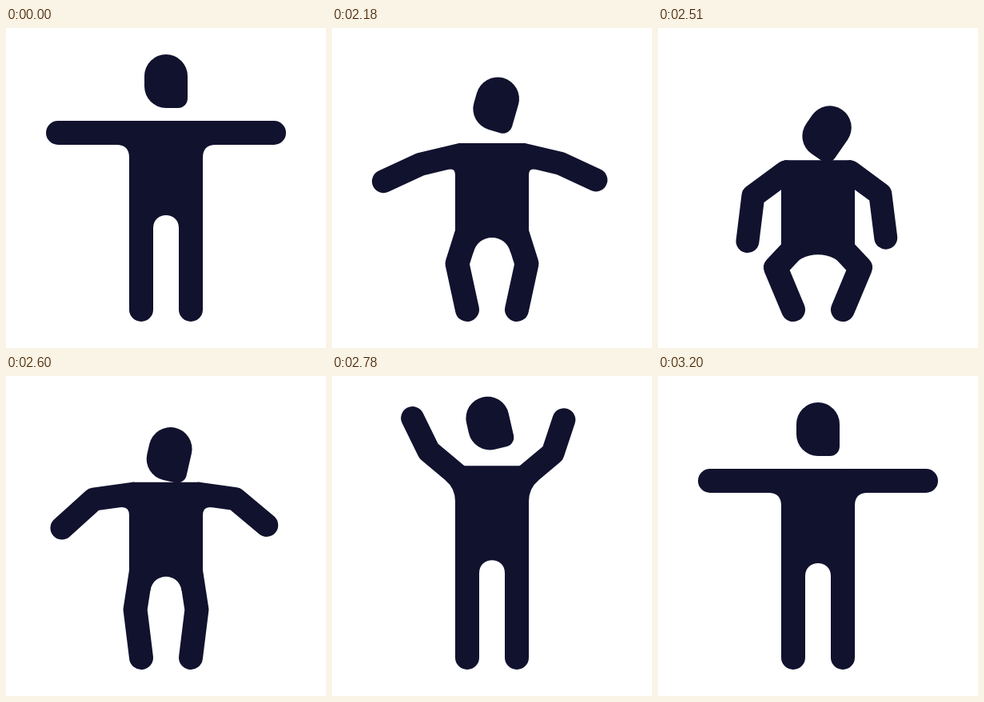
Write an HTML page with a canvas that moves like this. It is 400x400 px and loops after 3.26 s.

```html
<!DOCTYPE html>
<html>
<head>
<meta charset="utf-8">
<style>
html, body { margin: 0; height: 100%; overflow: hidden; background: #fff; }
canvas { display: block; width: 100vmin; height: 100vmin; }
</style>
</head>
<body>
<canvas width="400" height="400"></canvas>
<script>
const ctx = document.querySelector('canvas').getContext('2d');
const LOOP = 3260, START = 2030, END = 3200, STEP = 30, LEAD = 20;
const LEG = 15;

// When each part is lowest in the crouch and highest in the jump;
// outer parts trail behind the body.
const BODY = { low: 2400, high: 2710 };
const HEAD = { low: 2420, high: 2760 };
const UPPER_ARM = { low: 2455, high: 2780 };
const FOREARM = { low: 2480, high: 2815 };

// Raised angles in degrees, lengths in pixels.
const LEFT = { upper: 51, fore: 46, raise: -68 };
const RIGHT = { upper: 47, fore: 44, raise: -76 };

const ease = u => (1 - Math.cos(Math.PI * u)) / 2;
const rad = degrees => degrees * Math.PI / 180;

// Eases from rest to the crouch value, on to the jump value, and back to rest.
function swing(t, part, crouch, jump) {
  const between = (t0, t1, a, b) => a + (b - a) * ease((t - t0) / (t1 - t0));
  if (t < part.low) return between(START - LEAD, part.low, 0, crouch);
  if (t < part.high) return between(part.low, part.high, crouch, jump);
  return between(part.high, END, jump, 0);
}

function limb(points, radius) {
  ctx.lineWidth = radius * 2;
  ctx.beginPath();
  points.forEach(p => ctx.lineTo(...p));
  ctx.stroke();
}

function drawHead(x, y, tilt) {
  ctx.save();
  ctx.translate(x, y);
  ctx.rotate(tilt);
  ctx.beginPath();
  ctx.roundRect(-27, -33.5, 54, 67, [27, 27, 12, 27]);
  ctx.fill();
  ctx.restore();
}

// Draws a left arm; the caller mirrors it for the right.
function drawArm(shoulderY, upperLength, upper, foreLength, fore, r) {
  const sx = 160, ux = -Math.cos(upper), uy = Math.sin(upper);
  const ex = sx + upperLength * ux, ey = shoulderY + upperLength * uy;
  limb([[sx, shoulderY], [ex, ey],
    [ex - foreLength * Math.cos(fore), ey + foreLength * Math.sin(fore)]], r);

  // Rounded armpit, which closes as the arm goes down.
  const size = 16 * Math.min(1, Math.max(0, 1 - 2 * uy));
  const x = 154;
  const y = shoulderY - r * ux + uy * (x - sx - r * uy) / ux;
  ctx.beginPath();
  ctx.moveTo(x + ux * size, y + uy * size);
  ctx.quadraticCurveTo(x, y, x, y + size);
  ctx.lineTo(x + 4, y + size);
  ctx.lineTo(x + 4, y - 4);
  ctx.fill();
}

function drawTorso(top, hipY, knee) {
  const dx = knee[0] - 169, dy = knee[1] - hipY, length = Math.hypot(dx, dy);
  const tx = dx / length, ty = dy / length;
  const ax = 169 + ty * LEG + tx * 23, ay = hipY - tx * LEG + ty * 23;
  const bx = ax - 21 * tx, by = ay + (hipY + 7 - ay) * 4 / 3;
  ctx.beginPath();
  ctx.moveTo(158, top);
  ctx.lineTo(242, top);
  ctx.lineTo(246, top + 15);
  ctx.lineTo(246, hipY);
  ctx.lineTo(231, hipY);
  ctx.lineTo(400 - ax, ay);
  ctx.bezierCurveTo(400 - bx, by, bx, by, ax, ay);
  ctx.lineTo(169, hipY);
  ctx.lineTo(154, hipY);
  ctx.lineTo(154, top + 15);
  ctx.fill();
}

function draw(elapsed) {
  const moving = elapsed >= START && elapsed < END;
  const t = moving ? START + Math.floor((elapsed - START) / STEP) * STEP : END;

  const drop = swing(t, BODY, 70, -4);
  const headDrop = swing(t, HEAD, 77, -7.5);
  const tilt = swing(t, HEAD, 44, -13);
  const upper = rad(swing(t, UPPER_ARM, 42, -40));

  const top = 116 + drop, hipY = 227 + drop, bend = Math.max(0, drop);
  const knee = [169 - 0.445 * bend, 288 + 0.235 * bend];
  const armRadius = moving ? 14.5 : 15;

  ctx.clearRect(0, 0, 400, 400);
  ctx.fillStyle = ctx.strokeStyle = '#11122e';
  ctx.lineCap = ctx.lineJoin = 'round';

  drawHead(200 + 0.32 * tilt, 66.5 + headDrop, rad(tilt));
  drawTorso(top, hipY, knee);
  for (const arm of [LEFT, RIGHT]) {
    const fore = rad(swing(t, FOREARM, 86, arm.raise));
    const stretch = 11 * Math.max(0, Math.sin(fore));
    const foreLength = moving ? arm.fore + stretch : 95 - arm.upper;
    ctx.save();
    if (arm === RIGHT) ctx.transform(-1, 0, 0, 1, 400, 0);
    drawArm(top + armRadius, arm.upper, upper, foreLength, fore, armRadius);
    limb([[169, hipY], knee, [169, 367 - LEG]], LEG);
    ctx.restore();
  }
}

const begin = performance.now();
function tick() {
  draw((performance.now() - begin) % LOOP);
  requestAnimationFrame(tick);
}
tick();
</script>
</body>
</html>
```
